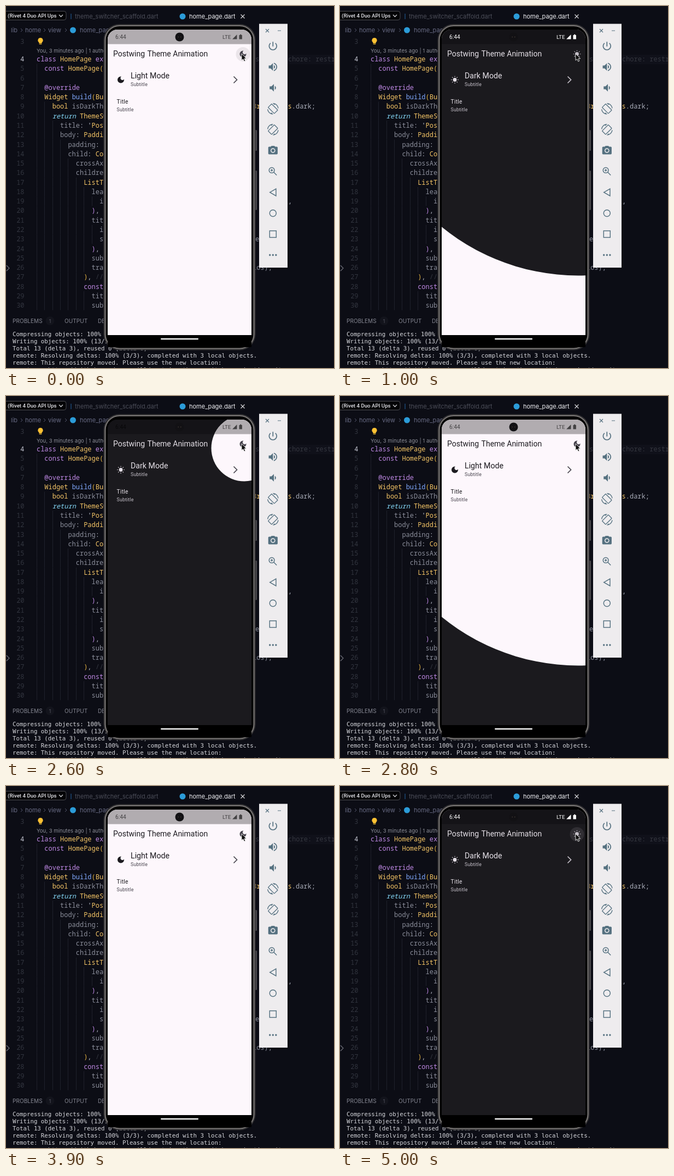
An HTML page that plays this animation: 600x660 px, repeating every 5.1 s.

```html
<!DOCTYPE html>
<html lang="en">
<head>
<meta charset="utf-8">
<title>Theme switch</title>
<style>
html, body { margin: 0; width: 100%; height: 100%; overflow: hidden; background: #0c0d15; }
svg { display: block; width: 600px; height: 660px; }
text { white-space: pre; }
.code { font: 500 11.97px "Noto Sans Mono", monospace; }
.term { font: 10.77px "DejaVu Sans Mono", monospace; fill: #d6d7dc; }
.ui { font-family: Inter, sans-serif; }
.app { font-family: Roboto, sans-serif; }
.line { fill: none; stroke-width: 1.7; }
</style>
</head>
<body>
<svg viewBox="0 0 600 660">
  <defs>
    <clipPath id="glass"><path d="M186 622V61a18 18 0 0 1 18-18h227a18 18 0 0 1 18 18v561z"/></clipPath>
    <clipPath id="reveal"><circle id="hole" cx="436" cy="95" r="0"/></clipPath>
  </defs>

  <rect width="600" height="660" fill="#0c0d15"/>
  <rect x="515" y="89" width="85" height="17" fill="#10111a"/>
  <g id="editor"></g>

  <g class="ui">
    <rect x="118" y="14" width="2" height="10" fill="#17385c"/>
    <rect x="-10" y="9.500" width="120" height="16" rx="4" fill="#050507" stroke="#4b4b50"/>
    <text class="app" x="3" y="21" font-size="9.700" font-weight="500" fill="#e4e4e8">(Rivet 4 Duo API Ups</text>
    <path class="line" d="M97 16l3.500 3.500L104 16" stroke="#d0d0d4" style="stroke-width:1.3"/>
    <g font-size="11">
      <text x="126" y="23" fill="#4c4e59">theme_switcher_scaffold.dart</text>
      <text x="335" y="23" fill="#eeeef2">home_page.dart</text>
    </g>
    <circle cx="323" cy="19" r="5.500" fill="#2b9cd8"/>
    <path class="line" d="M429.500 15.500l7 7m0-7l-7 7" stroke="#d8d8dc" style="stroke-width:1.2"/>
    <g font-size="11" fill="#676a83">
      <text x="9" y="48">lib</text><text x="35" y="48">home</text><text x="77" y="48">view</text><text x="135" y="48">home_page.dart</text>
    </g>
    <path class="line" d="M27 41l3 3-3 3M69 41l3 3-3 3M108 41l3 3-3 3" stroke="#565970" style="stroke-width:1"/>
    <circle cx="122.500" cy="44" r="5.500" fill="#2b9cd8"/>
    <path d="M63 58a4.600 4.600 0 0 0-2.600 8.400V68h5.200v-1.600A4.600 4.600 0 0 0 63 58zm-2.300 10.800h4.600V70h-4.600z" fill="#ffc233"/>
    <text x="56" y="84.500" font-size="9.600" fill="#8b8d97">You, 3 minutes ago | 1 author</text>
    <path class="line" d="M1 473l5 5-5 5" stroke="#73757f" style="stroke-width:1.1"/>
    <g font-size="10.100" fill="#858792">
      <text x="12" y="578">PROBLEMS</text><text x="107" y="578">OUTPUT</text><text x="168" y="578">DEBUG CONSOLE</text>
    </g>
    <circle cx="80.500" cy="574" r="8" fill="#13141c"/>
    <text x="80.500" y="577.500" font-size="9.500" text-anchor="middle" fill="#50525e">1</text>
  </g>
  <g id="terminal" class="term"></g>

  <g fill="#4a494d">
    <rect x="455" y="226" width="4" height="38" rx="1.500"/>
    <rect x="455" y="300" width="4" height="72" rx="1.500"/>
  </g>
  <rect x="178.500" y="33" width="278" height="594.500" rx="29" fill="#343335"/>
  <rect x="181.500" y="36" width="272" height="588.500" rx="26" fill="#000" stroke="#7b7877" stroke-width="2"/>

  <g class="app" clip-path="url(#glass)">
    <g id="screens"></g>
    <rect x="186" y="600" width="263" height="22"/>
    <rect x="283" y="605.700" width="69" height="2.600" rx="1.300" fill="#f4f4f4"/>
    <g id="status">
      <text x="200" y="60" font-size="10.200">6:44</text>
      <text x="396" y="60" font-size="9.900">LTE</text>
      <path d="M414 60.500h8.500V52zM426.500 53h1.500v-1.200h2.400V53h1.500v7.500h-5.400z"/>
    </g>
    <circle cx="317.500" cy="56.500" r="8" fill="#121114"/>
    <path d="M314.500 56.500h1.500m3 0h1.500" stroke="#3f3733" stroke-width="1.500"/>
  </g>

  <path d="M431 87v12.200l2.800-2.500 1.900 4.400 2.100-.9-1.900-4.300h3.700z" fill="#060606" stroke="#f5f5f5" stroke-width=".9"/>

  <rect x="463" y="32.500" width="52" height="444.500" fill="#eeecee"/>
  <g id="tools" fill="#557180"></g>
</svg>

<script>
const $ = id => document.getElementById(id);

// Each code line: indent in columns, then tokens written as <colour letter><text>.
const INK = {
  p: '#c08ae6', y: '#f6c667', g: '#8b8e9b', w: '#c5c8d4', c: '#86d9f8',
  d: '#34363f', b: '#e3b341', f: '#82aaff', s: '#a9acb8'
};
const CODE = [
  [0, 'pclass ', 'yHomePage ', 'pextends'],
  [2, 'pconst ', 'yHomePage', 'b('],
  [2],
  [2, 'p@override'],
  [2, 'yWidget ', 'fbuild', 'b(', 'yBui'],
  [4, 'ybool ', 'gisDarkTheme = Theme.of(context).brightness == ', 'yBrightness', 's.dark;'],
  [4, 'creturn ', 'yThemeSw'],
  [6, 'gtitle', 's: ', "w'", 'yPost'],
  [6, 'gbody', 's: ', 'yPaddin'],
  [8, 'gpadding', 's: '],
  [8, 'gchild', 's: ', 'yColu'],
  [10, 'gcrossAxis'],
  [10, 'gchildren'],
  [12, 'yListTi'],
  [14, 'glead'],
  [16, 'gico'],
  [14, 'p)', 's,'],
  [14, 'gtitl'],
  [16, 'gis'],
  [16, 'gst'],
  [14, 'p)', 's,'],
  [14, 'gsubt'],
  [14, 'gtrai'],
  [12, 'b)', 's, ', 'd// Li'],
  [12, 'pconst '],
  [14, 'gtitl'],
  [14, 'gsubt']
];
const COL = 7.18, LEFT = 56, lineY = n => 101 + (n - 4) * 17.28;
const number = (n, y) =>
  `<text x="33.500" y="${y}" text-anchor="end" fill="${n === 4 ? '#c3c5d0' : '#32353f'}">${n}</text>`;

const guides = CODE.map(([indent], i) => {
  let d = '';
  for (let c = 0; c < indent; c += 2) d += `M${Math.round(LEFT + c * COL) + .5} ${lineY(i + 4) - 13}v17.3`;
  return d;
}).join('');

const codeText = CODE.map(([indent, ...tokens], i) => {
  const spans = tokens.map(t => {
    const italic = t === 'creturn ' ? ' font-style="italic"' : '';
    return `<tspan fill="${INK[t[0]]}"${italic}>${t.slice(1)}</tspan>`;
  }).join('');
  const y = lineY(i + 4);
  return number(i + 4, y) + `<text x="${LEFT + indent * COL}" y="${y}">${spans}</text>`;
}).join('');

const tail = (n, x, ink, s) => `<text x="${x}" y="${lineY(n)}" fill="${INK[ink]}">${s}</text>`;
$('editor').innerHTML = `<path d="${guides}" stroke="#1f212c"/><g class="code">${number(3, 69)}${codeText}` +
  tail(4, 456, 'd', 's') + tail(4, 516, 'd', 'chore: restructure') + tail(19, 516, 's', ',') +
  tail(23, 456, 'g', 'eL') + tail(26, 451, 'g', 'los),') + '</g>';

$('terminal').innerHTML = [
  'Compressing objects: 100% (3/3), done.',
  'Writing objects: 100% (13/13), done.',
  'Total 13 (delta 3), reused 0 (delta 0)',
  'remote: Resolving deltas: 100% (3/3), completed with 3 local objects.',
  'remote: This repository moved. Please use the new location:',
  'remote:   https://github.com/novaquill/postwing_theme_switcher_animation.git'
].map((s, i) => `<text x="12" y="${602 + i * 13}">${s}</text>`).join('');

// Emulator side bar: 24-unit icons centred on the bar.
const path = d => `<path d="${d}"/>`;
const outline = shape => `<g class="line" stroke="#557180">${shape}</g>`;
const rotate = path('M16.480 2.520c3.270 1.550 5.610 4.720 5.970 8.480h1.500C23.440 4.840 18.290 0 12 0l-.66.03 3.810 3.810 1.330-1.320zm-6.250-.77c-.59-.59-1.540-.59-2.120 0L1.750 8.110c-.59.59-.59 1.540 0 2.120l12.020 12.020c.59.59 1.540.59 2.120 0l6.360-6.360c.59-.59.59-1.540 0-2.120L10.230 1.750zm4.600 19.440L2.810 9.170l6.360-6.360 12.020 12.020-6.360 6.360zm-7.310.29C4.250 19.940 1.910 16.760 1.550 13H.05C.56 19.160 5.710 24 12 24l.66-.03-3.810-3.810-1.330 1.320z');
const TOOLS = [
  path('M13 3h-2v10h2V3zm4.830 2.170-1.420 1.420C17.990 7.860 19 9.810 19 12c0 3.870-3.130 7-7 7s-7-3.130-7-7c0-2.190 1.010-4.140 2.580-5.420L6.170 5.170C4.230 6.820 3 9.260 3 12c0 4.970 4.030 9 9 9s9-4.030 9-9c0-2.740-1.230-5.180-3.170-6.830z'),
  path('M3 9v6h4l5 5V4L7 9H3zm13.500 3c0-1.770-1.020-3.290-2.500-4.030v8.050c1.480-.73 2.500-2.250 2.500-4.020zM14 3.230v2.060c2.890.86 5 3.540 5 6.710s-2.110 5.850-5 6.710v2.060c4.010-.91 7-4.490 7-8.770s-2.990-7.860-7-8.770z'),
  path('M18.500 12c0-1.770-1.020-3.290-2.500-4.030v8.050c1.480-.73 2.500-2.250 2.500-4.020zM5 9v6h4l5 5V4L9 9H5z'),
  rotate,
  `<g transform="matrix(-1 0 0 1 24 0)">${rotate}</g>`,
  path('M9 2 7.170 4H4c-1.100 0-2 .9-2 2v12c0 1.100.9 2 2 2h16c1.100 0 2-.9 2-2V6c0-1.100-.9-2-2-2h-3.170L15 2H9zm3 15c-2.760 0-5-2.240-5-5s2.240-5 5-5 5 2.240 5 5-2.240 5-5 5z') +
    '<circle cx="12" cy="12" r="3.200"/>',
  outline('<circle cx="9.500" cy="9.500" r="5.700"/><path d="M14 14l6 6M9.500 6.800v5.400M6.800 9.500h5.400"/>'),
  outline('<path d="M18.500 4.500v15L5.500 12z"/>'),
  outline('<circle cx="12" cy="12" r="7"/>'),
  outline('<rect x="5" y="5" width="14" height="14"/>'),
  '<circle cx="5.500" cy="12" r="2"/><circle cx="12" cy="12" r="2"/><circle cx="18.500" cy="12" r="2"/>'
];
$('tools').innerHTML =
  '<path d="M475 42l6 6m0-6l-6 6M497 45h6" stroke="#557180" stroke-width="1.200"/>' +
  TOOLS.map((icon, i) =>
    `<g transform="translate(488.300 ${73 + i * 38.1}) scale(.86) translate(-12 -12)">${icon}</g>`).join('');

// The app screen, once per theme.
const MOON = 'M12 3a9 9 0 1 0 9 9c0-.46-.04-.92-.1-1.360a5.389 5.389 0 0 1-4.400 2.260 5.403 5.403 0 0 1-3.140-9.800c-.44-.06-.9-.1-1.360-.1z';
const moon = (x, y) => `<path transform="translate(${x} ${y}) scale(.67) translate(-12 -12)" d="${MOON}"/>`;
const sun = (x, y) => {
  let rays = '';
  for (let a = 0; a < 8; a++) {
    const c = Math.cos(a * Math.PI / 4), s = Math.sin(a * Math.PI / 4);
    rays += `M${x + 5.2 * c} ${y + 5.2 * s}L${x + 6.8 * c} ${y + 6.8 * s}`;
  }
  return `<circle cx="${x}" cy="${y}" r="3.400"/><path d="${rays}" stroke-width="1.200"/>`;
};
const THEMES = [
  { name: 'Light', bg: '#fdf7fc', bar: '#b1acb0', ink: '#1d1b20', soft: '#49454f', hover: '#ebe5ea', icon: moon },
  { name: 'Dark', bg: '#1b1a1e', bar: '#141317', ink: '#e4dfe6', soft: '#c4bfc8', hover: '#302e33', icon: sun }
];
const screens = THEMES.map(t => {
  const g = document.createElementNS('http://www.w3.org/2000/svg', 'g');
  g.innerHTML = `<rect x="186" y="43" width="263" height="579" fill="${t.bg}"/>
    <rect x="186" y="43" width="263" height="26.500" fill="${t.bar}"/>
    <circle class="hover" cx="433.500" cy="88" r="13" fill="${t.hover}"/>
    <g fill="${t.ink}">
      <text x="196" y="92" font-size="14">Postwing</text>
      <text x="258.600" y="92" font-size="14">Theme Animation</text>
      <text x="228" y="132" font-size="14.200">${t.name} Mode</text>
      <text x="202.500" y="178" font-size="10.200" letter-spacing=".3">Title</text>
    </g>
    <g fill="${t.soft}" font-size="8.800" letter-spacing=".16">
      <text x="228" y="145.500">Subtitle</text><text x="202.500" y="192">Subtitle</text>
    </g>
    <g fill="${t.soft}" stroke="${t.soft}" stroke-width="0">${t.icon(433.5, 87.5)}</g>
    <g fill="${t.ink}" stroke="${t.ink}" stroke-width="0">${t.icon(210, 134.5)}</g>
    <path class="line" d="M416.500 128.500l6 6-6 6" stroke="${t.soft}"/>`;
  return g;
});
const hovers = screens.map(g => g.querySelector('.hover'));

const LOOP = 5100, STEP = 100, SPEED = 1.68;
const SWITCHES = [[-1000, 0], [764, 1], [2564, 0], [4164, 1]];

function draw(t) {
  const [at, theme] = SWITCHES.filter(s => s[0] <= t).pop();
  const over = screens[theme], under = screens[1 - theme];
  $('hole').setAttribute('r', (t - at) * SPEED);
  under.removeAttribute('clip-path');
  over.setAttribute('clip-path', 'url(#reveal)');
  $('screens').append(under, over);
  $('status').setAttribute('fill', theme ? '#fff' : 'rgba(0,0,0,.62)');
  const hover = t < 800 || t >= 4800 ? 1 : 0;
  hovers.forEach(h => h.setAttribute('opacity', hover));
}

let shown = -1;
function tick() {
  const t = Math.floor(performance.now() % LOOP / STEP) * STEP;
  if (t !== shown) draw(shown = t);
  requestAnimationFrame(tick);
}
tick();
</script>
</body>
</html>
```
